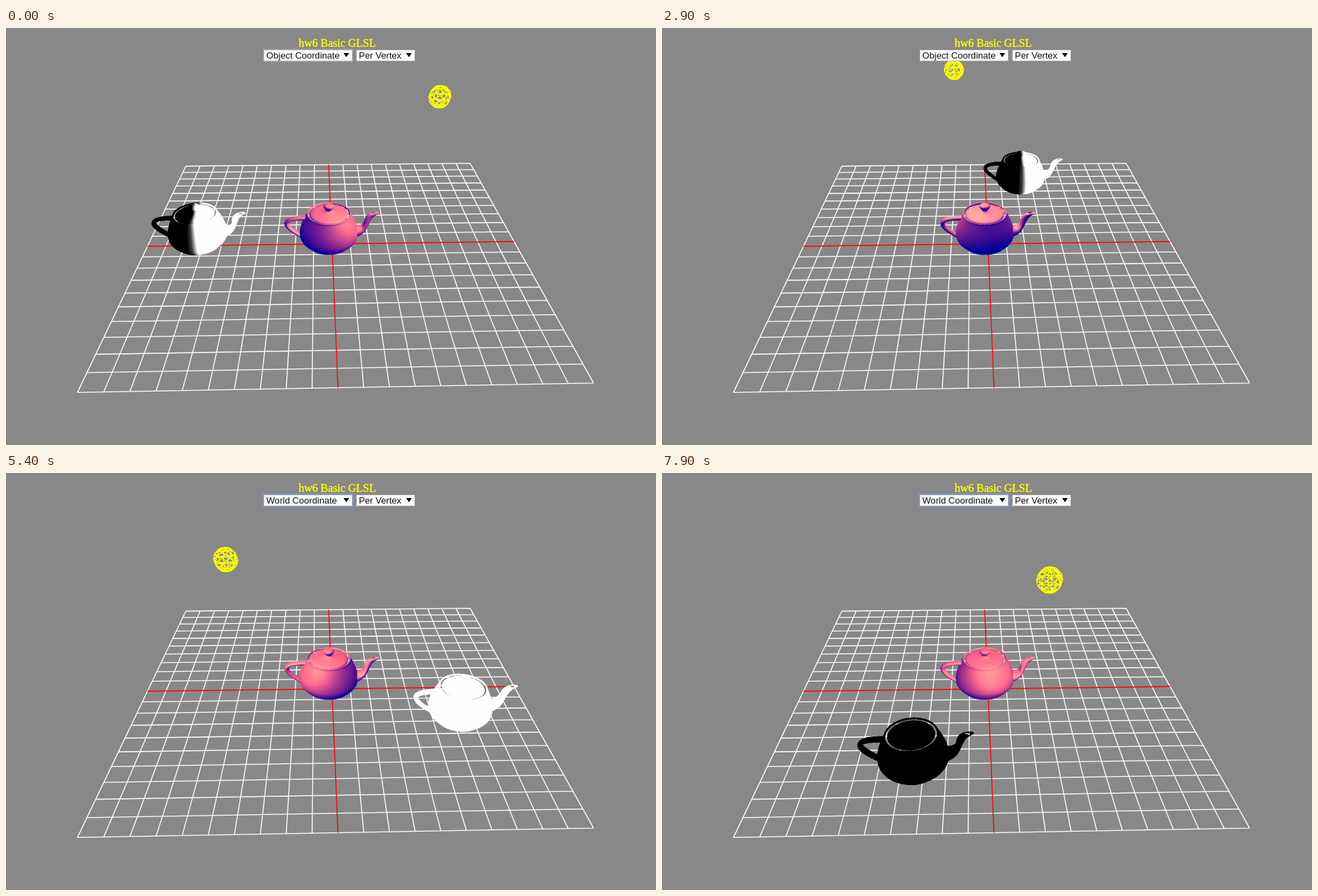
An HTML page with a canvas that plays this animation: 934x600 px, repeating every 8000 ms.

```html
<!DOCTYPE html>
<html lang="en">
<head>
<meta charset="utf-8">
<title>Teapots</title>
<style>
html, body { margin: 0; width: 100%; height: 100%; overflow: hidden; background: #888; }
#stage { position: absolute; left: 0; top: 0; width: 934px; height: 600px; overflow: hidden; }
canvas { position: absolute; left: 0; top: 0; }
#title {
  position: absolute; left: 276px; width: 400px; top: 12px; text-align: center;
  font: 16px/19px "Liberation Serif", "Times New Roman", serif;
  color: #ff0; -webkit-text-stroke: 0.4px #ff0;
}
.pick {
  position: absolute; top: 31px; height: 17px; box-sizing: border-box; padding-left: 3px;
  background: #fdfdfd; border: 1px solid #a9a9a9; white-space: nowrap;
  font: 13.1px/15px "Liberation Sans", Arial, sans-serif; color: #111;
}
.pick::after {
  content: ""; position: absolute; right: 4px; top: 4px;
  border: 4px solid transparent; border-top: 6px solid #000; border-bottom: 0;
}
#space { left: 370px; width: 128px; }
#shade { left: 503px; width: 85px; }
</style>
</head>
<body>
<div id="stage">
  <canvas id="view" width="934" height="600"></canvas>
  <div id="title">hw6 Basic GLSL</div>
  <div class="pick" id="space">Object Coordinate</div>
  <div class="pick" id="shade">Per Vertex</div>
</div>
<script>
const W = 934, H = 600, LOOP = 8000, STEP = 100;
const ctx = document.getElementById('view').getContext('2d');
const space = document.getElementById('space');

const { sin, cos, PI } = Math;
const clamp = v => Math.min(1, Math.max(0, v));
const smooth = t => t * t * (3 - 2 * t);

// Camera orbiting the origin; one unit is half the floor grid.
const CX = 468.4, CY = 310.6, FOCAL = 754, DIST = 2.862;
const PITCH = Math.asin(0.558), YAW = -0.0232;
const sp = sin(PITCH), cp = cos(PITCH), sy = sin(YAW), cy = cos(YAW);
const EYE = [DIST * cp * sy, DIST * sp, DIST * cp * cy];

function project(x, y, z) {
  const s = x * sy + z * cy;
  const d = DIST - cp * s - sp * y;
  return [CX + FOCAL * (x * cy - z * sy) / d, CY - FOCAL * (cp * y - sp * s) / d, 1 / d];
}

const sub = (a, b) => a.map((v, i) => v - b[i]);
const add = (a, b) => a.map((v, i) => v + b[i]);
const dot = (a, b) => a[0] * b[0] + a[1] * b[1] + a[2] * b[2];
const cross = (a, b) => [
  a[1] * b[2] - a[2] * b[1], a[2] * b[0] - a[0] * b[2], a[0] * b[1] - a[1] * b[0]];
const unit = a => {
  const l = Math.hypot(...a) || 1;
  return a.map(v => v / l);
};
const cubic = (a, b, c, d, t) => {
  const s = 1 - t;
  return s * s * s * a + 3 * s * t * (s * b + t * c) + t * t * t * d;
};

// Teapot mesh
const verts = [], tris = [];
const SEG = 10;

function patch(f, nv, sign) {
  const base = verts.length, e = 0.001;
  for (let i = 0; i <= SEG; i++) {
    for (let j = 0; j <= nv; j++) {
      const u = i / SEG, v = j / nv;
      const un = Math.min(0.998, Math.max(0.002, u));
      const du = sub(f(un + e, v), f(un - e, v));
      const dv = sub(f(un, v + e), f(un, v - e));
      verts.push({ p: f(u, v), n: unit(cross(dv, du)).map(c => c * sign) });
    }
  }
  for (let i = 0; i < SEG; i++) {
    for (let j = 0; j < nv; j++) {
      const a = base + i * (nv + 1) + j, b = a + 1, c = a + nv + 1, d = c + 1;
      if (sign > 0) tris.push([a, b, c], [b, d, c]);
      else tris.push([a, c, b], [b, c, d]);
    }
  }
}

// Surface of revolution from a radius and a height rule
function lathe(radius, height) {
  patch((u, v) => {
    const r = radius(u), a = v * 2 * PI;
    return [r * cos(a), height(u), r * sin(a)];
  }, SEG * 4, 1);
}

// Elliptic tube: centre x, y, half-axis x, y and half width along t
function tube(rule) {
  patch((u, v) => {
    const [x, y, hx, hy, w] = rule(u), a = v * 2 * PI;
    return [x - hx * cos(a), y - hy * cos(a), -w * sin(a)];
  }, SEG * 2, -1);
}

// Knob, lid, rim, upper body, lower body, base
lathe(u => 2.4 * u * (1 - u) ** 2 + 0.2 * u ** 3, u => 3.15 - 0.45 * smooth(u));
lathe(u => cubic(0.2, 0.4, 1.3, 1.3, u), u => cubic(2.7, 2.55, 2.55, 2.4, u));
lathe(u => 1.45 - 0.05 * cos(PI * u), u => 2.4 + 0.1 * sin(PI * u));
lathe(u => 1.5 + 0.75 * u - 0.25 * u ** 3, u => 2.4 - 1.5 * u);
lathe(u => 2 - 0.5 * smooth(u), u => 0.15 + 0.75 * Math.max(0, 1 - u) ** 1.8);
lathe(u => 1.5 * (1 - u ** 3), u => 0.15 * (1 - u) ** 2);

// Handle, spout, lip
tube(t => [cubic(-1.55, -3.3, -3.2, -1.95, t), cubic(2.14, 2.15, 1.6, 0.75, t),
  -0.14 * sin(PI * t), 0.13 * cos(PI * t), 0.225]);
tube(t => [cubic(1.7, 2.85, 2.35, 3, t), cubic(1.01, 1.125, 2.06, 2.4, t),
  0.3 * t, -0.41 * (1 - t) ** 2, 0.5 - 0.31 * smooth(t)]);
tube(t => [3 + 0.16 * sin(PI * t), 2.4 + 0.07 * sin(PI * t), 0.3 - 0.1 * t, 0, 0.19 - 0.08 * t]);

// Centre the pot between handle and spout.
const SCALE = 0.0782, MID = 0.214;
for (const v of verts) v.p = [(v.p[0] - MID) * SCALE, v.p[1] * SCALE, v.p[2] * SCALE];

// Small supersampled z-buffer for one pot
const SS = 2, BW = 210, BH = 140, PW = BW * SS, PH = BH * SS;
const buf = document.createElement('canvas');
buf.width = PW;
buf.height = PH;
const bctx = buf.getContext('2d');
const img = bctx.createImageData(PW, PH);
const zbuf = new Float32Array(PW * PH);

function drawPot(pos, paint) {
  const mid = project(pos[0], 0.12, pos[2]);
  const ox = Math.round(mid[0] - BW / 2), oy = Math.round(mid[1] - BH / 2);
  img.data.fill(0);
  zbuf.fill(0);
  const pts = verts.map(v => {
    const w = add(v.p, pos), q = project(...w);
    return { x: (q[0] - ox) * SS, y: (q[1] - oy) * SS, z: q[2], c: paint(w, v) };
  });
  for (const [a, b, c] of tris) fillTri(pts[a], pts[b], pts[c]);
  bctx.putImageData(img, 0, 0);
  ctx.drawImage(buf, ox, oy, BW, BH);
}

function fillTri(a, b, c) {
  const area = (b.x - a.x) * (c.y - a.y) - (b.y - a.y) * (c.x - a.x);
  if (area >= -1e-7) return;
  const x0 = Math.max(0, Math.floor(Math.min(a.x, b.x, c.x)));
  const x1 = Math.min(PW - 1, Math.ceil(Math.max(a.x, b.x, c.x)));
  const y0 = Math.max(0, Math.floor(Math.min(a.y, b.y, c.y)));
  const y1 = Math.min(PH - 1, Math.ceil(Math.max(a.y, b.y, c.y)));
  const px = img.data;
  for (let y = y0; y <= y1; y++) {
    for (let x = x0; x <= x1; x++) {
      const X = x + 0.5, Y = y + 0.5;
      const u = ((b.x - X) * (c.y - Y) - (b.y - Y) * (c.x - X)) / area;
      const v = ((c.x - X) * (a.y - Y) - (c.y - Y) * (a.x - X)) / area;
      const w = 1 - u - v;
      if (u < -1e-6 || v < -1e-6 || w < -1e-6) continue;
      const z = u * a.z + v * b.z + w * c.z, i = y * PW + x;
      if (z <= zbuf[i]) continue;
      zbuf[i] = z;
      for (let k = 0; k < 3; k++) {
        px[i * 4 + k] = 255 * (u * a.c[k] + v * b.c[k] + w * c.c[k]);
      }
      px[i * 4 + 3] = 255;
    }
  }
}

// Black left of the plane x = 0, white right of it
function split(world) {
  return (w, v) => {
    const g = 0.995 * clamp(0.5 + ((world ? w : v.p)[0] + 0.013) / 0.016);
    return [g, g, g];
  };
}

// Cool to warm shading with a soft highlight
function toon(light) {
  return (w, v) => {
    const l = unit(sub(light, w));
    const h = unit(add(l, unit(sub(EYE, w))));
    const warm = clamp(0.5 + 0.75 * dot(v.n, l));
    const s = 0.3 * Math.max(0, dot(v.n, h)) ** 5 * warm;
    return [warm + s, 0.38 * warm ** 1.5 + s, 0.6 - 0.08 * warm + 0.4 * s].map(clamp);
  };
}

function line(a, b) {
  ctx.moveTo(a[0], a[1]);
  ctx.lineTo(b[0], b[1]);
}

function drawGrid() {
  ctx.lineWidth = 1.35;
  for (const axis of [false, true]) {
    ctx.strokeStyle = axis ? '#f00' : '#fff';
    ctx.beginPath();
    for (let i = -10; i <= 10; i++) {
      if ((i === 0) !== axis) continue;
      const k = i / 10;
      line(project(k, 0, -1), project(k, 0, 1));
      line(project(-1, 0, k), project(1, 0, k));
    }
    ctx.stroke();
  }
}

function drawLamp(c) {
  const NU = 8, NV = 6, R = 0.0515;
  const at = (i, j) => {
    const a = i / NU * 2 * PI, b = j / NV * PI;
    return project(c[0] - R * cos(a) * sin(b), c[1] + R * cos(b), c[2] + R * sin(a) * sin(b));
  };
  ctx.strokeStyle = '#ff0';
  ctx.lineWidth = 1.3;
  ctx.beginPath();
  for (let i = 0; i < NU; i++) {
    for (let j = 0; j < NV; j++) {
      line(at(i, j), at(i, j + 1));
      if (j > 0) line(at(i, j), at(i + 1, j));
      if (j > 0 && j < NV - 1) line(at(i + 1, j), at(i, j + 1));
    }
  }
  ctx.stroke();
}

function draw(ms) {
  const ang = (1.2 + 37.5 * ms / 1000) * PI / 180;
  const lamp = [0.5 * cos(ang), 0.807, -0.5 * sin(ang)];
  const pot = [-0.703 * cos(ang), 0, -0.703 * sin(ang)];
  const world = ms >= 4400;

  space.textContent = (world ? 'World' : 'Object') + ' Coordinate';
  space.style.outline = ms >= 4000 ? '1px solid #6c9bea' : ms < 1400 ? '1px solid #a0a0a0' : 'none';

  ctx.fillStyle = '#888';
  ctx.fillRect(0, 0, W, H);
  drawGrid();
  drawPot(pot, split(world));
  drawPot([0, 0, 0], toon(lamp));
  drawLamp(lamp);
}

let last = -1;
function tick() {
  const ms = Math.floor(performance.now() % LOOP / STEP) * STEP;
  if (ms !== last) draw(last = ms);
  requestAnimationFrame(tick);
}
tick();
</script>
</body>
</html>
```
